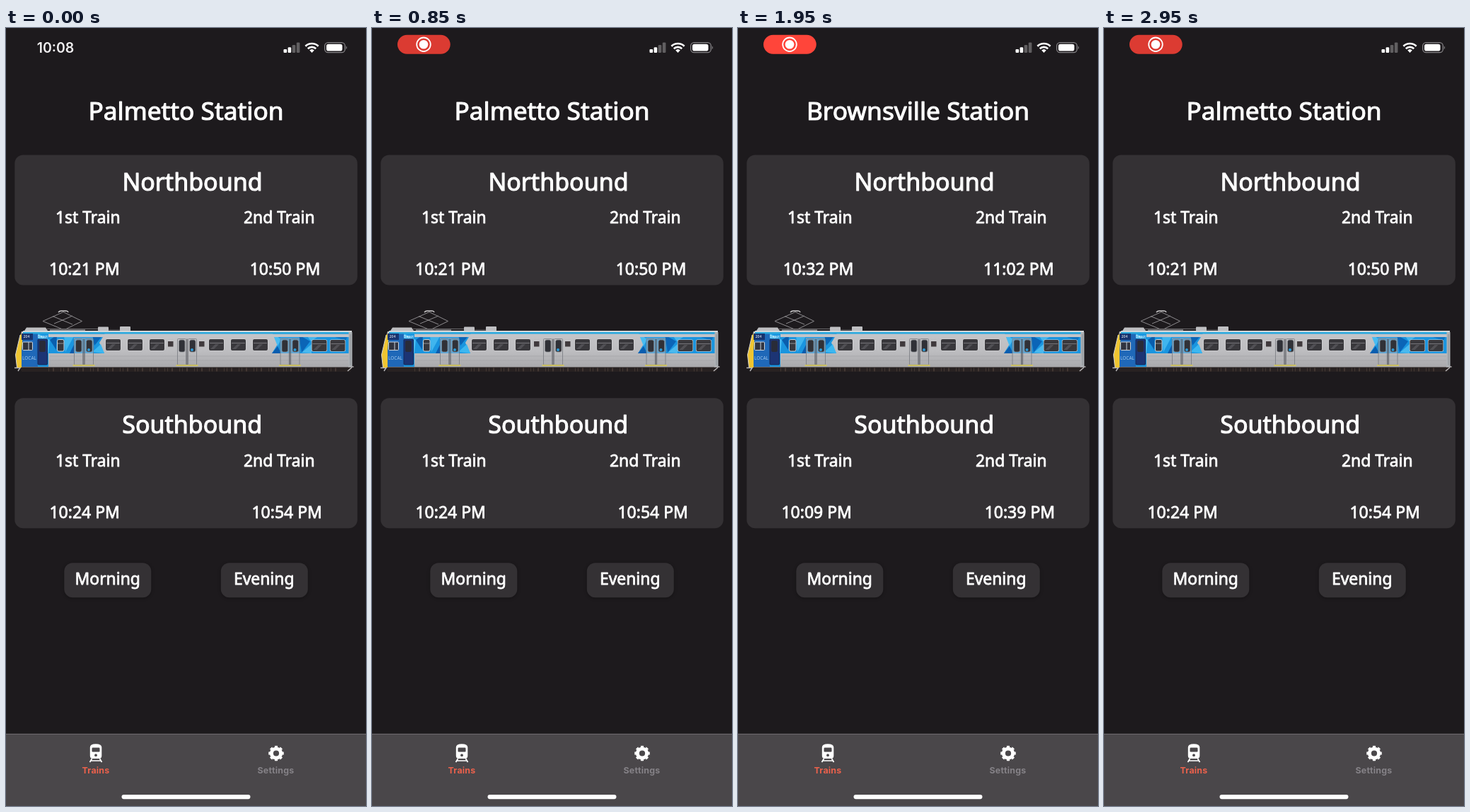
An HTML page for the animation above (3 s loop, 509 by 1100 pixels).

```html
<!DOCTYPE html>
<html lang="en">
<head>
<meta charset="utf-8">
<title>Train times</title>
<style>
html, body { margin: 0; width: 100%; height: 100%; overflow: hidden; background: #1d1a1d; }
svg { display: block; width: 100%; height: 100%; }
text { font-family: "Noto Sans", "Open Sans", sans-serif; font-weight: 400; fill: #fff; text-anchor: middle; }
.title, .head, .label, .time { stroke: #fff; stroke-linejoin: round; }
.title { font-size: 35.3px; stroke-width: 1.1px; }
.head { font-size: 34px; stroke-width: 1.1px; }
.label { font-size: 22.9px; stroke-width: .8px; }
.time { font-size: 23px; stroke-width: .8px; }
.clock { font: 600 19.5px Inter, Roboto, sans-serif; fill: #f0eff0; }
.tab { font: 700 12.4px Inter, Roboto, sans-serif; letter-spacing: .2px; }
.tiny { font-size: 5px; }
.card { fill: #343134; }
.button { filter: drop-shadow(0 1px 2px #0005); }

.clock, .pill, .pulse, .first, .second, .morning, .evening { animation: 3s linear infinite; }
.clock { animation-name: clock; }
.pill { animation-name: pill; }
.pulse { animation-name: pulse; animation-timing-function: cubic-bezier(.37, 0, .63, 1); }
.first { animation-name: first; animation-timing-function: step-end; }
.second { animation-name: second; animation-timing-function: step-end; }
.morning { animation-name: morning; }
.evening { animation-name: evening; }

@keyframes clock { 0%, 3.3% { opacity: 1; } 8.3%, 100% { opacity: 0; } }
@keyframes pill { 0%, 3.3% { opacity: 0; } 8.3%, 100% { opacity: 1; } }
@keyframes pulse {
  0%, 3.33% { fill: #ff453a; }
  33.33% { fill: #d83a31; }
  63.33% { fill: #ff453a; }
  93.33% { fill: #d83a31; }
  100% { fill: #dd3b32; }
}
@keyframes first { 0% { opacity: 1; } 43.3% { opacity: 0; } 83.3%, 100% { opacity: 1; } }
@keyframes second { 0% { opacity: 0; } 43.3% { opacity: 1; } 83.3%, 100% { opacity: 0; } }
@keyframes morning {
  0%, 36.2% { opacity: 1; }
  39.4%, 43.3% { opacity: .2; }
  51.6%, 100% { opacity: 1; }
}
@keyframes evening {
  0%, 76.2% { opacity: 1; }
  79.4%, 83.3% { opacity: .2; }
  91.6%, 100% { opacity: 1; }
}
</style>
</head>
<body>
<svg viewBox="0 0 509 1100" preserveAspectRatio="none">
  <defs>
    <linearGradient id="silver" x2="0" y2="1">
      <stop stop-color="#c6c6c9"/><stop offset=".55" stop-color="#bdbdc0"/><stop offset="1" stop-color="#a9a9ac"/>
    </linearGradient>
    <g id="window">
      <rect x="-.6" y="-.6" width="22.2" height="17.2" rx="2.5" fill="#d6d6d8"/>
      <rect width="21" height="16" rx="2" fill="#39383c"/>
      <path d="M1 5.5H20" stroke="#77767b"/>
      <path d="M2 14L9 7H14L7 14Z" fill="#515055"/>
    </g>
    <g id="leaf">
      <rect width="12" height="37" rx="1" fill="none" stroke="#77797f" stroke-width=".8"/>
      <rect x="2" y="1.5" width="8.5" height="17" rx="2.5" fill="#303137" stroke="#85878c" stroke-width=".7"/>
    </g>
    <g id="doors">
      <use href="#leaf"/><use href="#leaf" x="15"/>
      <path d="M13.5 0V37" stroke="#4c4d53"/>
      <path d="M-2 37.5H29" stroke="#d9c94a" stroke-width="1.5"/>
      <circle cx="20.5" cy="15.5" r="2" fill="#2d9bd8"/>
    </g>
    <g id="panel">
      <rect class="card" width="484.5" height="184" rx="12"/>
      <text class="label" x="103.5" y="96.5">1st Train</text>
      <text class="label" x="374" y="96.5">2nd Train</text>
    </g>
  </defs>

  <rect width="509" height="1100" fill="#1d1a1d"/>

  <!-- status bar -->
  <text class="clock" x="70" y="35">10:08</text>
  <g class="pill">
    <rect class="pulse" x="36" y="9.8" width="74.7" height="27" rx="13.5"/>
    <circle cx="73" cy="23.3" r="9.8" fill="none" stroke="#fff" stroke-width="1.8"/>
    <circle cx="73" cy="23.3" r="6.3" fill="#fff"/>
  </g>
  <g fill="#fff">
    <rect x="392.5" y="30" width="4.6" height="5" rx="1.2"/>
    <rect x="398.6" y="27.3" width="4.6" height="7.7" rx="1.2"/>
    <rect x="404.7" y="24" width="4.6" height="11" rx="1.2" opacity=".3"/>
    <rect x="410.8" y="20.4" width="4.6" height="14.6" rx="1.2" opacity=".3"/>
    <path d="M432.5 35L429.2 31.6A4.8 4.8 0 0 1 435.8 31.6Z"/>
  </g>
  <g fill="none" stroke="#fff" stroke-width="2.7">
    <path d="M426.8 29.2A8.2 8.2 0 0 1 438.2 29.2"/>
    <path d="M423.4 25.7A13 13 0 0 1 441.6 25.7"/>
  </g>
  <rect x="450.7" y="20.7" width="28.6" height="14" rx="4.6" fill="none" stroke="#858386" stroke-width="1.3"/>
  <rect x="453" y="22.8" width="22.5" height="9.8" rx="2.8" fill="#fff"/>
  <path d="M480.8 25.2Q483.4 27.6 480.8 30.2Z" fill="#858386"/>

  <!-- timetable -->
  <use href="#panel" x="12.3" y="179.5"/>
  <use href="#panel" x="12.3" y="523.2"/>
  <text class="head" x="263.5" y="229.5">Northbound</text>
  <text class="head" x="263.3" y="573.3">Southbound</text>
  <g class="first">
    <text class="title" x="254.5" y="130">Palmetto Station</text>
    <text class="time" x="110.8" y="349">10:21 PM</text>
    <text class="time" x="394.5" y="349">10:50 PM</text>
    <text class="time" x="111.2" y="693">10:24 PM</text>
    <text class="time" x="397.2" y="693">10:54 PM</text>
  </g>
  <g class="second">
    <text class="title" x="254.5" y="130">Brownsville Station</text>
    <text class="time" x="113.5" y="349">10:32 PM</text>
    <text class="time" x="396.8" y="349">11:02 PM</text>
    <text class="time" x="111.2" y="693">10:09 PM</text>
    <text class="time" x="398.4" y="693">10:39 PM</text>
  </g>

  <!-- train -->
  <g fill="none" stroke="#8d8b8e" stroke-width="1">
    <path d="M80 426L52 414.5L81 401.5L107.5 414.5L84 426M68 418L94 407M94 419L66 407.5"/>
    <path d="M74 402Q75.5 400 78 400H85Q87.5 400 88 402" stroke="#d0ced0" stroke-width="1.4"/>
    <path d="M58 425.5H131M145 427H161" stroke="#6f6d70"/>
  </g>
  <g fill="#bfbfc2">
    <path d="M26 428L29 423.5H56L59 428Z"/>
    <rect x="130" y="422.5" width="15" height="6" rx="1"/>
    <rect x="161" y="422" width="15" height="6.5" rx="1"/>
    <path d="M62 426.5H112V429H62Z" fill="#8f8f93"/>
  </g>
  <path d="M18 478H487V486H22Z" fill="#282222"/>
  <path d="M60 483H470" stroke="#433733" stroke-width="5" stroke-dasharray="1 5 2 9 1 3"/>
  <path d="M12 480.5H20L17 485M484 479H491.5M483 485L489 480" fill="none" stroke="#b9b7b8" stroke-width="1.5"/>
  <path d="M22 429H489V477L484 479.5H16L14 462Z" fill="url(#silver)"/>

  <path d="M22 432H140L132 445L139 460H60V479H21V450Z" fill="#1a95df"/>
  <path d="M22 432H45V479H20Z" fill="#1f68b8"/>
  <path d="M45 432L62 441L60 460L48 452Z" fill="#48b9ef"/>
  <path d="M62 441L72 434L71 455Z" fill="#0a5eae"/>
  <path d="M82 434H97L84 458Z" fill="#40b5ee"/>
  <path d="M122 434L139 432L125 449Z" fill="#0b64b5"/>
  <path d="M122 458L134 447L139 460Z" fill="#3cb7f0"/>
  <path d="M90 460L97 446V460Z" fill="#0b5cad"/>

  <path d="M377 432H485V460H376L384 447Z" fill="#1a95df"/>
  <path d="M377 432L389 440L384 450Z" fill="#49bcf1"/>
  <path d="M376 460L384 450L389 460Z" fill="#0a5daf"/>
  <path d="M414 434L430 443L418 459Z" fill="#0b65b7"/>
  <path d="M418 459L432 447V460Z" fill="#4ab9ee"/>
  <path d="M424 433H446L431 443Z" fill="#47b7ed"/>
  <path d="M450 432L485 432L480 442Z" fill="#0d74c3"/>
  <path d="M96 438H123V460H96ZM388 438H415V460H388Z" fill="#5fa9da"/>

  <path d="M60 434.7H485" stroke="#c3c4c8" stroke-width="4.5"/>
  <path d="M24 429H489" stroke="#d3d8db" stroke-width="2"/>
  <path d="M24 431.2H489" stroke="#29a9df" stroke-width="2.4"/>
  <path d="M62 464H484M62 470H484" stroke="#a4a4a8" stroke-width=".7"/>
  <path d="M484.5 430H489.5V479H484.5Z" fill="#aeb2b6"/>
  <path d="M487 433V477" stroke="#8a8d91"/>

  <path d="M20 434L24 431L22 456V480H15.5L13.5 462Z" fill="#efc531"/>
  <path d="M20 434L13.5 462L15.5 480" fill="none" stroke="#d4d4d4"/>
  <path d="M22 432H38V441H22Z" fill="#17346f"/>
  <rect x="23.5" y="444" width="14" height="11.5" rx="1" fill="#313440" stroke="#c9d3dd"/>
  <path d="M32 444V455" stroke="#c9d3dd"/>
  <rect x="45" y="440" width="13.5" height="36" rx="1" fill="#1c3474" stroke="#132756"/>
  <rect x="47" y="442" width="9" height="16" rx="2" fill="#292c39"/>
  <text class="tiny" x="29" y="437.5">204</text>
  <text class="tiny" x="52" y="437.5">Depot</text>
  <text class="tiny" x="33" y="468.5" style="font-size:6.5px;fill:#9fc6ec">LOCAL</text>

  <rect x="72.5" y="440.5" width="9.5" height="16.5" rx="2" fill="#37383e" stroke="#cfd5da"/>
  <path d="M73 446H82" stroke="#8f9398"/>
  <use href="#doors" x="96.5" y="439.5"/>
  <use href="#doors" x="242.5" y="439.5"/>
  <use href="#doors" x="388" y="439.5"/>
  <use href="#window" x="141" y="440"/><use href="#window" x="172" y="440"/><use href="#window" x="203" y="440"/>
  <use href="#window" x="287" y="440"/><use href="#window" x="318" y="440"/><use href="#window" x="349" y="440"/>
  <use href="#window" x="432.5" y="441"/><use href="#window" x="458.5" y="441"/>
  <rect x="229" y="443" width="7.5" height="7.5" fill="#403a3d"/>
  <rect x="273" y="443" width="7.5" height="7.5" fill="#403a3d"/>

  <!-- buttons -->
  <g class="morning">
    <rect class="card button" x="82.3" y="756.3" width="123" height="49" rx="12"/>
    <text class="label" x="143.7" y="787">Morning</text>
  </g>
  <g class="evening">
    <rect class="card button" x="303.8" y="756.3" width="123" height="49" rx="12"/>
    <text class="label" x="364.7" y="787">Evening</text>
  </g>

  <!-- tab bar -->
  <rect y="998" width="509" height="102" fill="#4a474a"/>
  <path d="M0 998.3H509" stroke="#737074"/>
  <path d="M118.8 1017Q118.8 1012.3 127 1012.3T135.3 1017V1029Q135.3 1033 131.3 1033H122.8Q118.8 1033 118.8 1029Z" fill="#fff"/>
  <rect x="121.5" y="1017.5" width="11" height="6" rx="1.2" fill="#4a474a"/>
  <circle cx="127" cy="1028.2" r="1.9" fill="#4a474a"/>
  <path d="M121.5 1033L118.5 1038M132.5 1033L135.5 1038M120 1036H134" stroke="#fff" stroke-width="1.7"/>
  <g fill="none" stroke="#fff">
    <circle cx="382" cy="1025.5" r="6.6" stroke-width="5"/>
    <circle cx="382" cy="1025.5" r="9.3" stroke-width="3" pathLength="16" stroke-dasharray="1.1 .9" stroke-dashoffset=".55"/>
  </g>
  <text class="tab" x="127" y="1053.5" style="fill:#ea614c">Trains</text>
  <text class="tab" x="381.5" y="1053.5" style="fill:#858287">Settings</text>
  <rect x="163.5" y="1084" width="182" height="6.2" rx="3.1" fill="#fff"/>
</svg>
</body>
</html>
```
